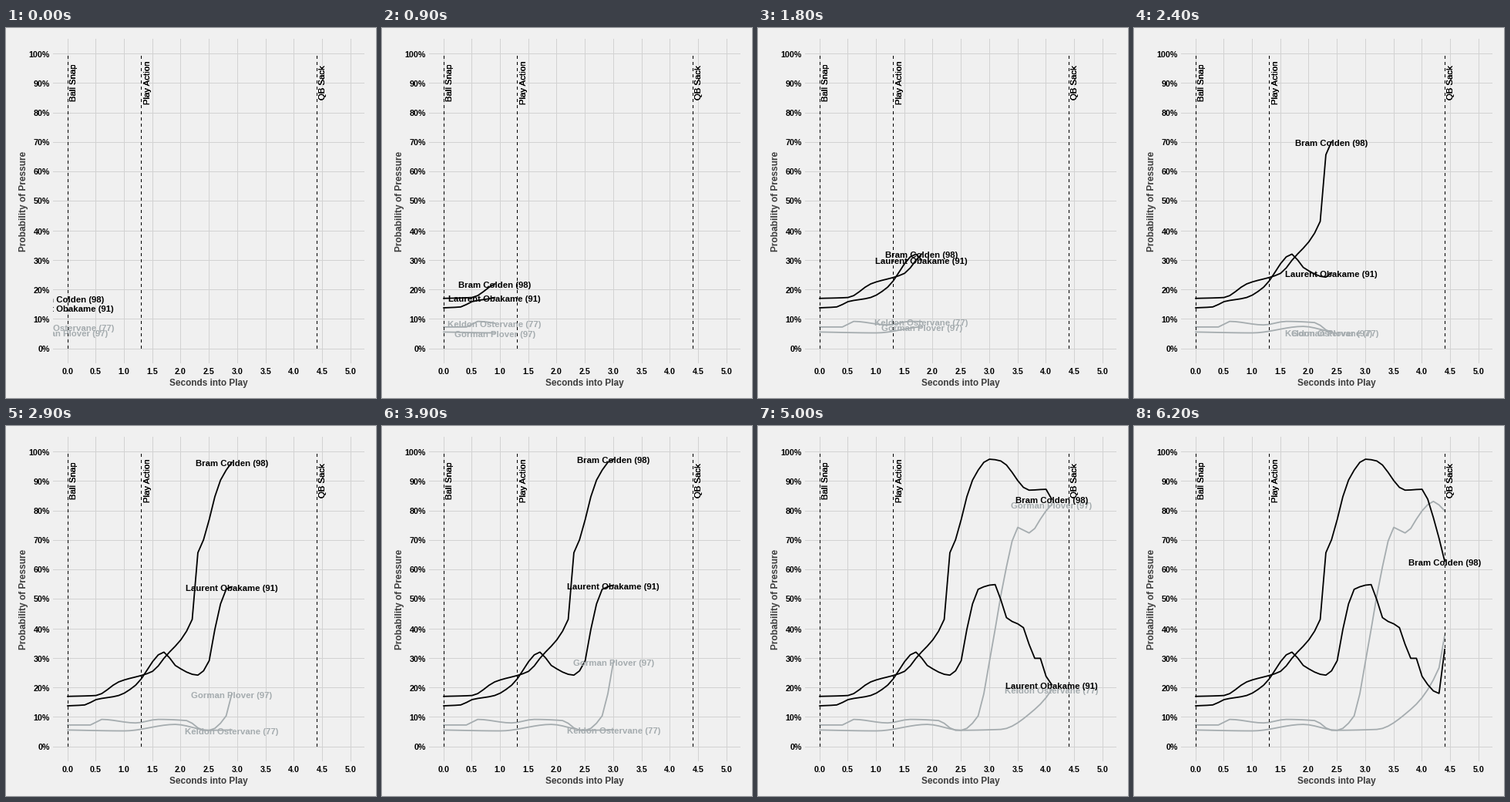
Recreate the animation shown at these times as a matplotlib script. Size 480 by 480 pixels, loop 6300 ms.

```python
import numpy as np
import matplotlib.pyplot as plt
from matplotlib.animation import FuncAnimation
from matplotlib.patches import Rectangle

SIZE, DPI = 480, 72
BG, GRID, TITLE = "#F0F0F0", "#D2D2D2", "#3C3C3C"
BLACK, SILVER = "#000000", "#A5ACAF"
LEFT, RIGHT, TOP, BOTTOM = 61, 465, 14, 435
PAUSE_AT, PAUSE, LAST, FRAMES = 29, 9, 44, 63
LEADER = "Bram Colden (98)"

plt.rcParams["font.family"] = "Liberation Sans"

# Turning points of each curve: (seconds, percent)
players = [
    ("Gorman Plover (97)", SILVER,
     [(0, 5.7), (1, 5.4), (1.9, 7.6), (2.5, 5.6), (2.8, 10.5), (3, 29),
      (3.3, 61), (3.5, 74.4), (3.7, 72.5), (4, 80), (4.2, 83.2), (4.4, 80)]),
    ("Keldon Ostervane (77)", SILVER,
     [(0, 7.4), (0.4, 7.4), (0.6, 9.3), (1.2, 8.1), (1.6, 9.3), (2.1, 8.9),
      (2.4, 5.6), (3.2, 5.9), (3.8, 12.7), (4.3, 26.8), (4.4, 37.8)]),
    ("Laurent Obakame (91)", BLACK,
     [(0, 13.9), (0.3, 14.2), (0.5, 16), (0.9, 17.4), (1.2, 20.9),
      (1.7, 32.1), (1.9, 27.6), (2.3, 24.3), (2.5, 29.2), (2.6, 39.8),
      (2.8, 53.4), (3.1, 55), (3.3, 43.8), (3.6, 40.4), (3.8, 30),
      (3.9, 30), (4, 23.9), (4.3, 18.1), (4.4, 33)]),
    (LEADER, BLACK,
     [(0, 17.1), (0.5, 17.4), (0.9, 22), (1.5, 25.6), (1.7, 30), (2.2, 43.2),
      (2.3, 65.8), (2.4, 70.2), (2.7, 90.4), (3, 97.5), (3.2, 96.9),
      (3.7, 87), (4, 87.3), (4.2, 77.7), (4.4, 62.9)]),
]


def px(sec):
    return 80.1 + 73.4 * sec


def py(pct):
    return 416.2 - 3.827 * pct


def smooth(t, points):
    """Cubic curve through the points that never overshoots them."""
    x, y = np.array(points, float).T
    h = np.diff(x)
    d = np.diff(y) / h
    product, total = d[:-1] * d[1:], d[:-1] + d[1:]
    same = product > 0
    inner = np.where(same, 2 * product / np.where(same, total, 1), 0)
    slope = np.concatenate([d[:1], inner, d[-1:]])
    i = np.clip(np.searchsorted(x, t, side="right") - 1, 0, len(h) - 1)
    u = (t - x[i]) / h[i]
    ease = u * u * (3 - 2 * u)
    bend = u * (1 - u) * ((1 - u) * slope[i] - u * slope[i + 1])
    return y[i] + (y[i + 1] - y[i]) * ease + h[i] * bend


fig = plt.figure(figsize=(SIZE / DPI, SIZE / DPI), dpi=DPI, facecolor=BG)
ax = fig.add_axes([0, 0, 1, 1])
ax.set(xlim=(0, SIZE), ylim=(SIZE, 0))
ax.axis("off")
panel = Rectangle((LEFT, TOP), RIGHT - LEFT, BOTTOM - TOP,
                  transform=ax.transData)


def rule(xs, ys, color, style="-", z=1):
    ax.plot(xs, ys, color=color, lw=1, ls=style, snap=False, zorder=z,
            solid_capstyle="butt", dash_capstyle="butt")


def write(x, base, text, size, color=BLACK, weight="bold", ha="center",
          rot=0, z=5):
    return ax.text(x, base, text, fontsize=size, color=color, weight=weight,
                   ha=ha, va="baseline", rotation=rot,
                   rotation_mode="anchor", zorder=z)


# Grid and axis text
for pct in range(0, 101, 10):
    row = int(py(pct)) + 0.5
    rule([LEFT, RIGHT], [row, row], GRID)
    write(57, row + 4, f"{pct}%", 10.6, ha="right")
for half in range(11):
    col = int(px(half / 2)) + 0.5
    rule([col, col], [TOP, BOTTOM], GRID)
    write(col - 0.5, 449, f"{half / 2:.1f}", 10.6)
write(263, 464, "Seconds into Play", 11.7, TITLE)
write(25.6, 224.5, "Probability of Pressure", 11.9, TITLE, rot=90)

# Play events; the repeated text gives the heavier strokes
for sec, event in [(0, "Ball Snap"), (1.3, "Play Action"), (4.4, "QB Sack")]:
    col = int(px(sec)) + 0.5
    rule([col, col], [416, py(100)], BLACK, (0, (4, 4)), z=4)
    for _ in range(3):
        write(px(sec + 0.08) + 5.5, py(90) - 1, event, 11.38,
              weight="normal", rot=90)

times = np.arange(LAST + 1) / 10
xs = px(times)
tracks = []
for order, (name, color, points) in enumerate(players):
    line, = ax.plot([], [], color=color, lw=1.8, solid_joinstyle="round",
                    zorder=2 + order / 10)
    label = write(0, 0, name, 11.38, color, z=6 + order / 10)
    label.set_clip_on(True)
    label.set_clip_path(panel)
    tracks.append((name, py(smooth(times, points)), line, label))


def step(frame):
    """Play time in tenths, with a pause partway and a hold at the end."""
    if frame > PAUSE_AT:
        frame = max(PAUSE_AT, frame - PAUSE)
    return min(frame, LAST)


def draw(frame):
    now = step(frame)
    closing = frame == FRAMES - 1
    for name, ys, line, label in tracks:
        line.set_data(xs[:now + 1], ys[:now + 1])
        label.set_position((xs[now], ys[now] + 5.3))
        label.set_visible(not closing or name == LEADER)
    return []


anim = FuncAnimation(fig, draw, frames=FRAMES, interval=100, repeat=True,
                     repeat_delay=0, blit=False)
plt.show()
```
